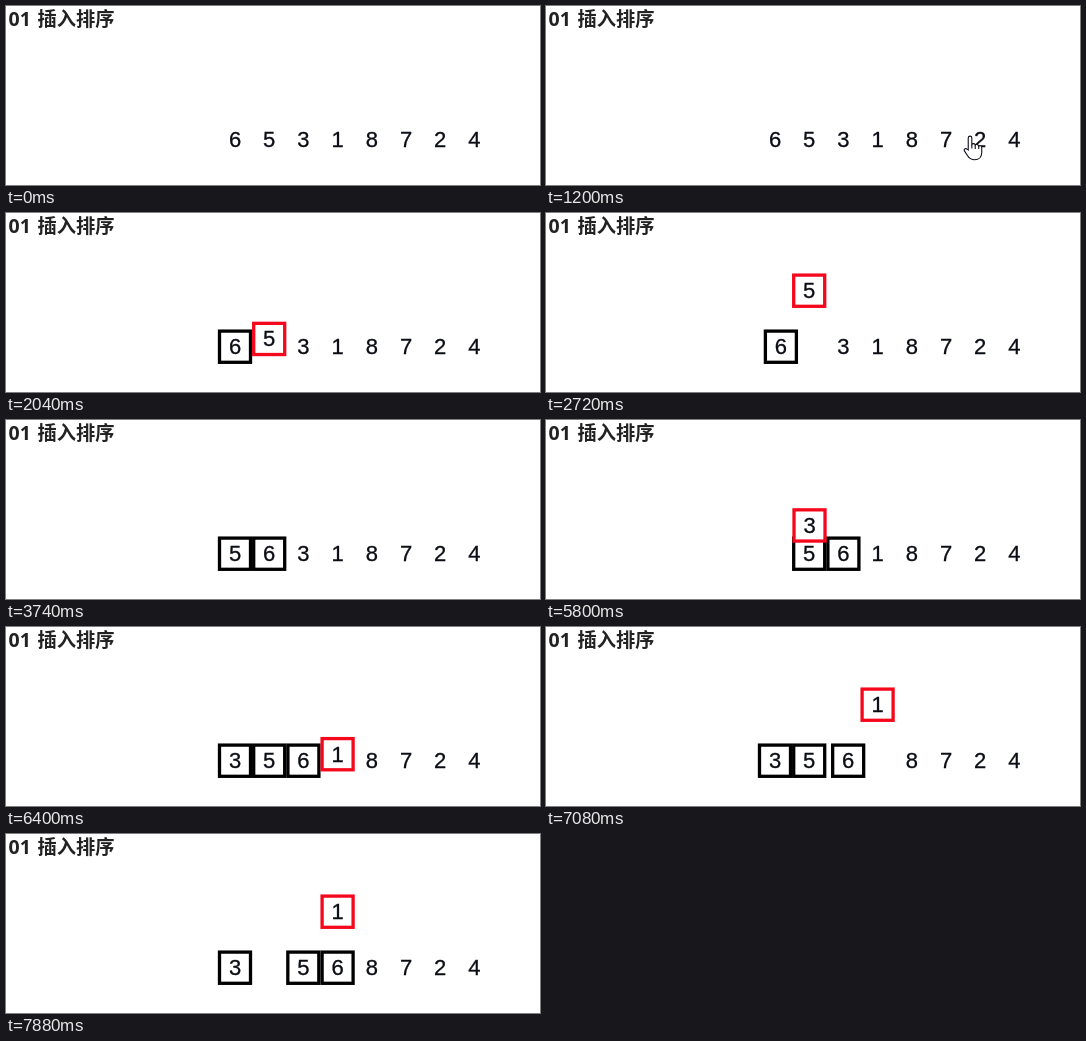
Recreate the animation shown at these times as an HTML page with a canvas. Size 534x179 px, loop 8 s.

```html
<!DOCTYPE html>
<html lang="zh">
<head>
<meta charset="utf-8">
<style>
  html, body { margin: 0; width: 534px; height: 179px; overflow: hidden; background: #fff; }
  canvas { display: block; }
</style>
</head>
<body>
<canvas id="stage" width="534" height="179"></canvas>
<script>
const ctx = document.getElementById('stage').getContext('2d');
const LOOP = 8000, LAST = 7880;
const values = [6, 5, 3, 1, 8, 7, 2, 4];
const SLOT_X = 229, STEP = 34.2, ROW_Y = 133.5, RISE = 56;

// Each round: raise the next number, shift the sorted ones, drop it into slot 0.
const PREP = 892, SLIDE = 430, DROP = 650;
const starts = [0, 1755];
for (let k = 1; k < 3; k++) starts.push(starts[k] + PREP + SLIDE * k + DROP);

const hand = new Path2D('M5 14.5V2.5a1.8 1.8 0 0 1 3.6 0V9c1-1.3 3-1 3.4.5 1-1 3-.5 3.5 1 1.5-.8 3 0 3 2V17c0 4.5-3 7.3-7 7.3s-6-2-7.5-4.5L1 15.2c-.6-1.6 1.6-2.6 2.8-1.5z');
const knuckles = new Path2D('M8.6 9v4M12 9.5v4M15.5 10.5v3');
const handPath = [[650, 325, 180], [960, 358, 135], [1200, 417, 129.5], [1700, 535, 93]];

const ramp = (t, start, length) => Math.min(1, Math.max(0, (t - start) / length));

function pose(i, t) {
  if (i >= 4) return { slot: i, lift: 0, alpha: 0 };
  let slot = i, lift = 0, alpha = ramp(t, 1350, 200), color = '#000';
  if (i > 0) {
    const start = starts[i];
    const drop = ramp(t, start + PREP + SLIDE * i, DROP);
    slot -= i * drop;
    lift = ramp(t, start + 200, 620) - drop;
    alpha = ramp(t, start + 50, 150);
    if (drop < 1) color = '#f5071c';
  }
  for (let k = i + 1; k < starts.length; k++) slot += ramp(t, starts[k] + PREP + SLIDE * i, SLIDE);
  return { slot, lift, alpha, color };
}

function drawNumber(value, i, t) {
  const { slot, lift, alpha, color } = pose(i, t);
  const x = SLOT_X + slot * STEP, y = ROW_Y - lift * RISE;
  if (alpha > 0) {
    const box = [x - 15.5, y - 15.4, 31, 31.2];
    ctx.globalAlpha = alpha;
    ctx.fillStyle = '#fff';
    ctx.strokeStyle = color;
    ctx.lineWidth = 3.3;
    ctx.fillRect(...box);
    ctx.strokeRect(...box);
    ctx.globalAlpha = 1;
  }
  ctx.fillStyle = ctx.strokeStyle = '#0b0e14';
  ctx.lineWidth = 0.3;
  ctx.font = '22px "Liberation Sans", Arial, sans-serif';
  ctx.textAlign = 'center';
  ctx.fillText(value, x, y + 7.6);
  ctx.strokeText(value, x, y + 7.6);
}

function drawHand(t) {
  const n = handPath.findIndex(p => t < p[0]);
  if (n < 1) return;
  const [t0, x0, y0] = handPath[n - 1], [t1, x1, y1] = handPath[n];
  const p = ramp(t, t0, t1 - t0);
  ctx.save();
  ctx.translate(x0 + (x1 - x0) * p, y0 + (y1 - y0) * p);
  ctx.fillStyle = '#fff';
  ctx.strokeStyle = '#10101c';
  ctx.lineWidth = 1.1;
  ctx.fill(hand);
  ctx.stroke(hand);
  ctx.stroke(knuckles);
  ctx.restore();
}

function drawTitle() {
  ctx.fillStyle = '#222';
  ctx.textAlign = 'left';
  ctx.font = 'bold 19.5px "Noto Sans", "Open Sans", sans-serif';
  ctx.fillText('01', 2.5, 19.5);
  ctx.font = 'bold 19.3px "Noto Sans CJK SC", "Noto Sans CJK", sans-serif';
  ctx.fillText('插入排序', 31.5, 19.5);
}

function frame(now) {
  const t = Math.min(now % LOOP, LAST);
  ctx.fillStyle = '#fff';
  ctx.fillRect(0, 0, 534, 179);
  drawTitle();
  values.forEach((value, i) => drawNumber(value, i, t));
  drawHand(t);
  requestAnimationFrame(frame);
}
requestAnimationFrame(frame);
</script>
</body>
</html>
```
